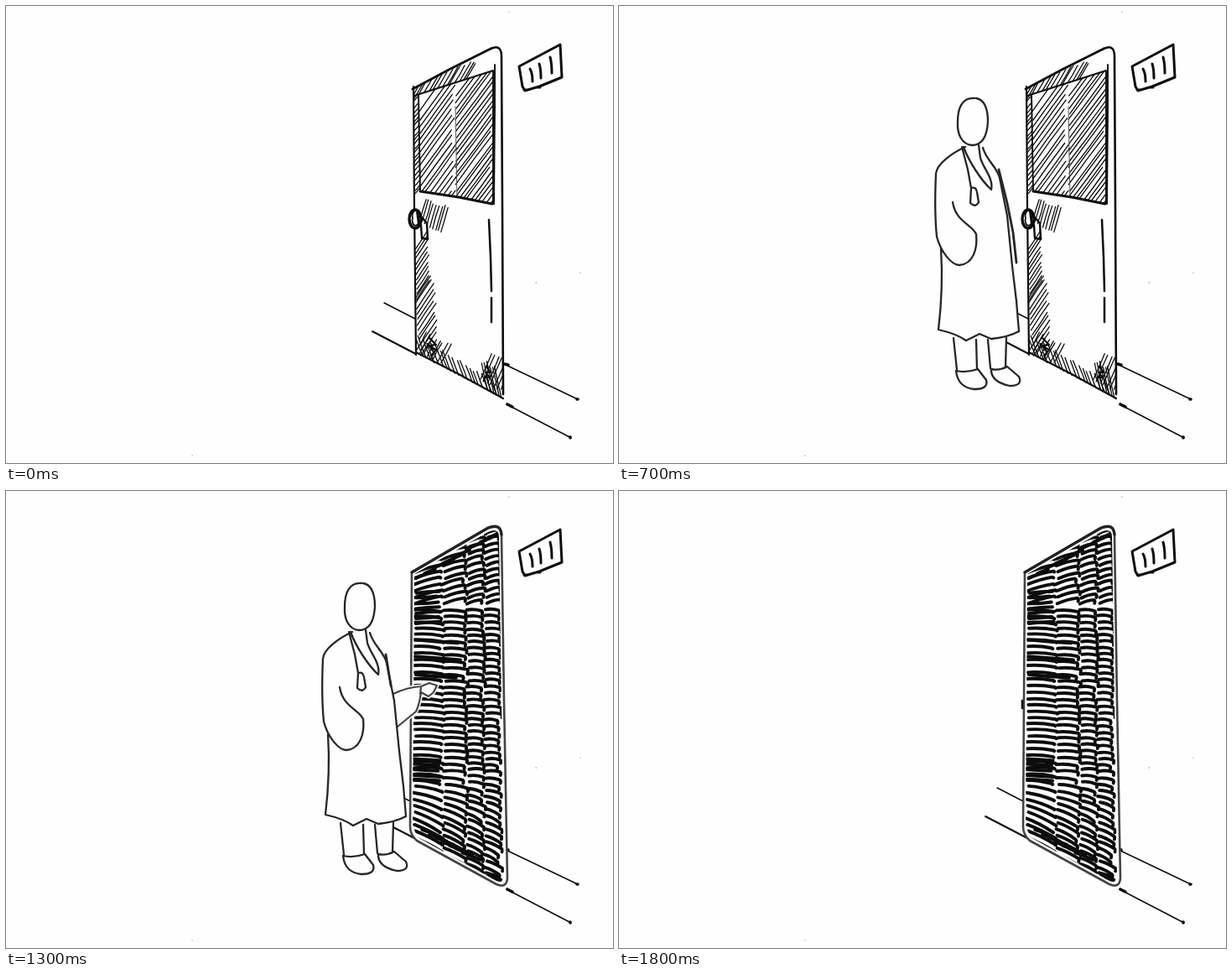
An HTML page with a canvas for the animation above (1900 ms loop, 724 by 545 pixels).

```html
<!DOCTYPE html>
<html>
<head>
<meta charset="utf-8">
<title>Through the door</title>
<style>
html, body { margin: 0; width: 100%; height: 100%; overflow: hidden; background: #fefefe }
canvas { display: block }
</style>
</head>
<body>
<canvas id="stage" width="724" height="545"></canvas>
<script>
const ctx = document.getElementById('stage').getContext('2d');
const PAPER = '#fefefe', INK = '#0c0c0c', SOFT = '#444';
ctx.lineCap = ctx.lineJoin = 'round';

let seed = 1;
const rand = () => (seed = seed * 16807 % 2147483647) / 2147483647;
const jitter = n => (rand() - .5) * n;

function ink(d, width = 2, color = INK) {
  ctx.lineWidth = width;
  ctx.strokeStyle = color;
  ctx.stroke(new Path2D(d));
}

function blank(d) {
  ctx.fillStyle = PAPER;
  ctx.fill(new Path2D(d));
}

function clipped(d, paint) {
  ctx.save();
  ctx.clip(new Path2D(d));
  paint();
  ctx.restore();
}

// count parallel pen strokes, each starting one step further on
function hatch(x, y, stepX, stepY, count, dx, dy, width = 1.3, color = INK) {
  for (let i = 0; i < count; i++) {
    const sx = x + i * stepX + jitter(2), sy = y + i * stepY + jitter(2), k = .88 + rand() * .2;
    ink(`M${sx} ${sy} q${dx * k / 2 + jitter(2)} ${dy * k / 2 + jitter(2)} ${dx * k} ${dy * k}`, width, color);
  }
}

function room() {
  ink('M612 72L661 46L663 85L636 96L619 101L616 96ZM618 100h5M634 97h3', 3);
  ink('M625 75Q628 80 628 90M636 69Q638 75 638 86M649 61Q651 68 651 80', 3);
  ink('M451 354L488 373M594 427L682 469M597 475L674 515', 1.5);
  ink('M437 388L489 415', 2);
  ink('M595 427l4 1M598 475l6 3M681 469h1M673 514v1', 3.6);
  ink('M632 330h.5M600 7h.2M222 536h.2M685 318h.2', 1, '#777');
}

const DOOR = 'M486 97L578 51Q590 46 591 58L593 468L489 415Z';
const WINDOW = 'M492 106L581 77L581 236L494 221Z';

function closedDoor() {
  blank(DOOR);
  clipped(WINDOW, () => {
    hatch(493, 128, 0, 8, 20, 42, -58);
    hatch(537, 108, 0, 7, 28, 46, -62);
    ink('M536 120L538 232', 1, '#555');
  });
  clipped('M486 98L560 62L560 84L487 107Z', () => hatch(484, 108, 5, -1.5, 14, 14, -24));
  clipped('M486 100L493 106L494 221L488 232Z', () => hatch(485, 112, 0, 5.5, 22, 10, -12));
  clipped(DOOR, () => {
    hatch(493, 256, 3.2, 1.8, 9, 8, -28);
    hatch(488, 290, .2, 6, 11, 15, -23);
    hatch(488, 350, .6, 6, 12, 20, -30);
    hatch(496, 416, 5, 2.9, 19, -9, -24);
    hatch(490, 412, 4, 2, 8, 12, -22);
    hatch(566, 446, 4, 2, 7, 14, -32);
    hatch(575, 460, 3.4, 1.5, 6, -8, -36);
  });
  ink('M505 396l8 8l-9 1l9 5l-6 7M503 403l6 8M573 430l5 7l-6 0l5 6l-6 0', 2.2);
  ink('M486 96L487 240L489 416', 2.2);
  ink('M485 99L530 75L578 51', 2.8);
  ink('M578 51Q591 45 591 60L592 240L593 463', 2.6);
  ink('M489 413L540 439L593 468', 2.2);
  ink('M487 107L581 77L581 235M583 70V120L582 236M492 106L494 221', 1.9);
  ink('M494 221L540 228L580 236', 3);
  ink('M576 255L578 300L579 340M579 348V377', 2.5);
  blank('M481 254a7 11 0 1 0 14 0a7 11 0 1 0-14 0');
  ink('M481 254a7 11 0 1 0 14 0a7 11 0 1 0-14 0', 3.4);
  ink('M485 253a4 6 0 1 0 7 0a4 6 0 1 0-7 0M490 246l2 15', 1.8);
  ink('M495 261L496 277L503 278L502 259L496 252', 2.4);
}

function openDoor() {
  blank('M437 340H488V420H437ZM478 31H615V437L601 479L478 420Z');
  clipped('M487 95L541 88L550 438L489 409Z', () => {
    hatch(485, 90, 0, 6, 58, 64, 4, 1.5, '#333');
    hatch(504, 252, .2, 5, 21, 44, 10, 1.5, '#333');
    hatch(486, 362, 0, 7, 9, 60, 22, 1.6, '#333');
    hatch(508, 250, 0, 20, 5, 1, 22, 3, '#555');
  });
  clipped('M488 93L582 34L541 90L487 100Z', () => hatch(486, 104, 5, -5, 13, 95, -25, 1.3, '#333'));
  ink('M490 189L535 186M513 345L545 352', 2.6, '#222');
  ink('M479 98L481 150L485 230M487 290V405', 1.4, '#777');
  ink('M479 98L480 125', 2.4);
  ink('M488 92L530 67L582 35', 3);
  ink('M583 35L565 58L541 88', 2.4);
  ink('M589 32L593 150L596 290L601 455', 1.7);
  ink('M601 450Q602 468 590 466L550 445', 2, SOFT);
  ink('M540 95L543 240L547 350L551 438', 2.8);
  ink('M489 410L550 440', 2.8);
  ink('M532 253a5 8 0 1 0 10 0a5 8 0 1 0-10 0', 3.6);
}

const DARK = 'M484 97L575 44Q590 38 591 52L594 250L598 462Q597 474 585 469L490 417Q482 410 482 400Z';

function darkDoorway() {
  blank(DARK);
  clipped('M487 99L575 49Q587 43 588 54L591 250L594 460Q593 468 585 465L491 413L485 400Z', () => {
    const columns = [[487, 519], [523, 547], [551, 568], [572, 588]];
    columns.forEach(([left, right], c) => {
      const width = right - left;
      for (let y = 44; y < 480; y += 7.6 + jitter(1.4)) {
        const slope = y < 140 ? -.28 : y > 330 ? Math.min(.5, (y - 330) / 110) : .06;
        const x = left + jitter(4), hook = c ? 4 : 1;
        ink(`M${x} ${y}q${width / 2} ${slope * width / 2 - 2} ${width + jitter(3)} ${slope * width}q2 1 1 ${hook}`, 3.9);
      }
    });
    hatch(489, 122, 0, 6, 7, 28, -2, 4);
    hatch(488, 177, 0, 21, 3, 52, 4, 4);
    hatch(486, 320, 0, 6, 5, 34, 2, 4);
    hatch(497, 404, 8, 4.6, 7, 22, 9, 4);
    hatch(488, 104, 11, -6, 9, 12, -5, 4);
    hatch(572, 456, 2, 4, 3, 16, 4, 4);
  });
  ink(DARK, 2.6, SOFT);
  ink('M484 97L575 44Q590 38 591 52', 3.4, '#222');
  ink('M481 250v9', 2.6);
}

// each figure: silhouette to knock out, then pen lines
const facing = {
  body: 'M378 87C368 92 357 110 358 128C359 140 367 145 376 144C388 143 394 130 394 112C395 95 392 86 378 87Z' +
    'M364 143L350 158L328 168C323 200 318 235 320 262L323 282L318 357L338 370L345 418V430Q348 444 371 444L406 443Q408 433 392 422L396 377L419 360L417 299L423 292L412 180L390 152V143Z',
  lines: 'M378 87C368 92 357 110 358 128C359 140 367 145 376 144C388 143 394 130 394 112C395 95 392 83 378 87' +
    'M364 144L361 151C358 168 370 190 378 205C390 190 394 175 389 145' +
    'M362 148L350 158Q330 163 327 170C323 200 318 235 320 262C324 280 334 288 341 290C350 285 356 272 353 262C349 250 346 240 348 225' +
    'M349 159L350 198M348 203a3 3 0 1 0 6 0a3 3 0 1 0-6 0M390 151L403 164L412 180C413 215 420 260 423 292L416 299' +
    'M395 160L398 182L403 195L409 245L415 300L418 355M400 185C390 190 386 198 387 208' +
    'M323 282L318 357C335 365 345 370 366 370L374 373L388 377C400 376 412 370 419 361' +
    'M338 370L345 415M366 372L369 418M372 373L373 420M396 380L390 423' +
    'M345 417L371 418L371 444C360 444 346 440 345 430ZM373 424L392 422C402 428 409 438 406 443C398 446 380 445 372 443',
  width: 2.7
};

const standing = {
  body: 'M404 138a18 28 0 1 0 36 0a18 28 0 1 0-36 0M411 167L378 194L377 230L380 280L386 330L381 386L399 395L403 437L408 453L424 457L438 454L448 447L466 453L478 450L463 430L462 394L477 388L463 250L452 196L433 168Z',
  lines: 'M426 110C437 112 440 125 440 138C439 155 433 166 421 166C409 165 403 153 404 138C404 122 409 109 424 110' +
    'M411 168C417 185 432 208 444 219C447 205 434 193 431 181L429 166M434 169C438 184 451 192 454 205L463 250L469 310L474 352L477 388' +
    'M413 168C398 175 379 188 378 200Q376 245 379 275C384 294 397 309 406 309C422 308 428 290 426 272C421 260 402 258 398 234' +
    'M384 290Q387 335 381 386Q403 391 414 399L430 391L444 397Q464 395 477 388' +
    'M409 168L416 195L420 217M420 217Q426 215 427 222L429 234Q425 241 419 235Z' +
    'M399 396L403 434M426 398L427 433M440 398L443 432M462 396L461 430' +
    'M402 435Q414 438 428 433L438 446Q441 457 424 457Q404 455 402 435M444 433Q454 435 463 430L477 442Q482 453 466 453Q443 448 444 433',
  width: 2.3
};

const striding = {
  body: 'M512 129a17.5 28 0 1 0 35 0a17.5 28 0 1 0-35 0M520 156C500 168 488 182 485 200C480 235 479 260 482 285L476 373L505 389L508 415Q505 440 524 446L530 452Q560 443 571 418L560 414L547 422L545 386L569 373L568 297L581 292L586 270L556 188L538 155Z',
  lines: 'M512 129a17.5 28 0 1 0 35 0a17.5 28 0 1 0-35 0' +
    'M520 156L516 163L547 209L538 156M540 160C548 172 552 190 556 220C562 260 566 310 569 372' +
    'M516 161C500 168 488 182 485 200C480 235 479 260 482 278C490 292 505 303 515 302C526 297 527 280 520 270C508 258 505 240 507 222' +
    'M545 165C562 195 568 230 580 255C588 270 585 280 581 288L570 297M576 294q5 7 8 0l-2-6' +
    'M482 285L479 330L476 373Q492 376 507 390L525 379C540 386 556 387 569 372' +
    'M517 163C522 180 521 195 524 208L519 218C524 231 531 230 531 222Z' +
    'M505 390L523 432L547 424L531 383M545 386L534 401' +
    'M523 434L548 426C560 415 570 411 571 418C565 435 550 449 530 452C524 448 523 440 523 434M508 414C503 430 510 443 524 446',
  width: 2.2
};

function figure(pose, dx = 0, dy = 0) {
  ctx.save();
  ctx.translate(dx, dy);
  blank(pose.body);
  if (pose === striding) ink(pose.body, 5, PAPER);
  ink(pose.lines, pose.width, pose === standing ? '#262626' : SOFT);
  ctx.restore();
}

function visitor(reaching) {
  if (reaching) {
    const arm = 'M462 242Q478 234 495 233L505 229L514 232L510 240L504 245L495 240Q493 255 489 263L467 281';
    blank(arm + 'Z');
    ink(arm, 5, PAPER);
    ink(arm + 'M495 234L494 242', 2.2, SOFT);
  }
  figure(standing);
  ink(reaching ? 'M453 195L459 232' : 'M453 195L463 235L470 270L474 306', 2.8, '#262626');
}

const THRESHOLD = 'M0 0H591L598 545H0Z';
const STEP = 100, LOOP = 1900;
const entrance = [
  null, [striding, -305, -2], [facing, -98, 0], [striding, -207, 2],
  [facing, 0, 0], [facing, 27, 8], [striding, -107, 8]
];
const exit = { 14: [-50, 4], 15: [0, 0], 16: [24, -2], 17: [62, -4] };

function draw(step) {
  seed = 77;
  ctx.fillStyle = PAPER;
  ctx.fillRect(0, 0, 724, 545);
  room();
  if (step < 10) closedDoor();
  else if (step < 12) openDoor();
  else darkDoorway();

  if (entrance[step]) figure(...entrance[step]);
  else if (step >= 7 && step <= 13) visitor(step > 7);
  else if (exit[step]) clipped(THRESHOLD, () => figure(striding, ...exit[step]));
}

let shown = -1;
function tick() {
  const step = Math.floor(performance.now() % LOOP / STEP);
  if (step !== shown) draw(shown = step);
  requestAnimationFrame(tick);
}
tick();
</script>
</body>
</html>
```
